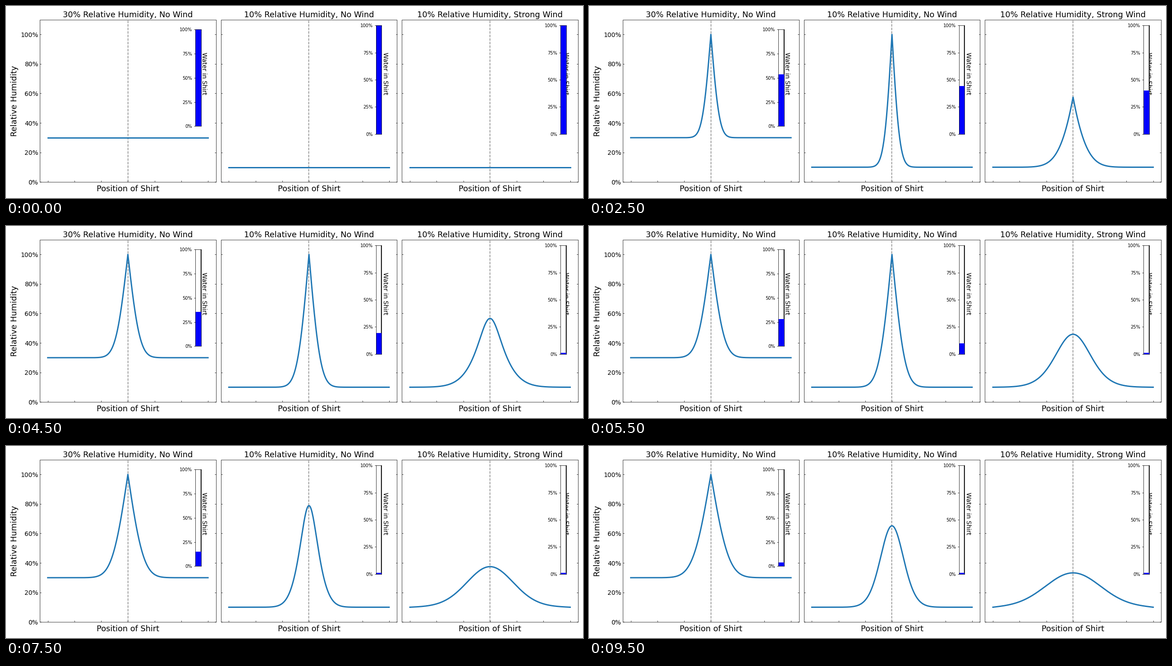
A matplotlib script for the animation above (10000 ms loop, 1280 px wide and 427 px high).

```python
import math
import numpy as np
import matplotlib.pyplot as plt
from matplotlib.animation import FuncAnimation
from matplotlib.patches import Rectangle

W, H = 1280, 427
# layout units: the figure is designed on an 18 x 6 inch sheet at 72 units per inch
SHEET_W, SHEET_H = 1296, 432
DPI = W / 18
FRAMES, INTERVAL = 20, 500

# Diffusion model: lengths in grid cells, time in seconds, humidity in percent
POINTS = 357
SUBSTEPS = 300
EVAPORATION = 867.0
FULL_SHIRT = 3620.0
AMBIENT = np.array([30.0, 10.0, 10.0])
DIFFUSIVITY = np.array([53.0, 53.0, 265.0])
MIN_FILL = 0.0125

TITLES = ("30% Relative Humidity, No Wind",
          "10% Relative Humidity, No Wind",
          "10% Relative Humidity, Strong Wind")
PANEL_LEFT, PANEL_TOP = 75.78, 30.8
PANEL_W, PANEL_H, PANEL_GAP = 395.94, 365.12, 10.8
# left, top, width, height of each water gauge
GAUGES = ((425.45, 52.9, 13.15, 217.5),
          (831.45, 43.8, 12.15, 244.3),
          (1245.45, 43.8, 13.15, 244.3))


def simulate():
    """Humidity profiles and water fractions at every frame."""
    dt = INTERVAL / 1000 / SUBSTEPS
    mid = POINTS // 2
    air = np.repeat(AMBIENT[:, None], POINTS, axis=1)
    water = np.full(3, FULL_SHIRT)
    rate = DIFFUSIVITY[:, None] * dt
    profiles, fills = [air.copy()], [water / FULL_SHIRT]
    for _ in range(FRAMES - 1):
        for _ in range(SUBSTEPS):
            air[:, 1:-1] += rate * (air[:, 2:] - 2 * air[:, 1:-1] + air[:, :-2])
            room = np.maximum(100 - air[:, mid], 0)
            vapour = np.minimum(np.minimum(EVAPORATION * dt, room), water)
            air[:, mid] += vapour
            water = water - vapour
        profiles.append(air.copy())
        fills.append(np.maximum(water / FULL_SHIRT, MIN_FILL))
    return profiles, fills


def add_axes(left, top, width, height):
    return fig.add_axes([left / SHEET_W, 1 - (top + height) / SHEET_H,
                         width / SHEET_W, height / SHEET_H])


def add_frame(left, top, width, height):
    """Thin outline whose edges sit on whole layout units."""
    x0, x1, y0, y1 = (math.floor(v + 0.5) + 0.5
                      for v in (left, left + width, top, top + height))
    fig.add_artist(Rectangle((x0 / SHEET_W, 1 - y1 / SHEET_H),
                             (x1 - x0) / SHEET_W, (y1 - y0) / SHEET_H,
                             fill=False, lw=0.8, snap=False,
                             transform=fig.transFigure))


def make_panel(index):
    left = PANEL_LEFT + index * (PANEL_W + PANEL_GAP)
    box = (left, PANEL_TOP, PANEL_W, PANEL_H)
    ax = add_axes(*box)
    ax.spines[:].set_visible(False)
    add_frame(*box)
    ax.set_xlim(-1.1, 1.1)
    ax.set_ylim(0, 110)
    ax.set_title(TITLES[index], fontsize=18)
    ax.set_xticks(np.linspace(-1, 1, 7), [""] * 7)
    levels = range(0, 101, 20)
    ax.set_yticks(levels, [f"{v}%" if index == 0 else "" for v in levels])
    ax.tick_params(direction="in", right=True, labelsize=14)
    if index == 0:
        ax.set_ylabel("Relative Humidity", fontsize=18)
    ax.text(0.5, -0.0585, "Position of Shirt", fontsize=18, ha="center",
            transform=ax.transAxes)
    ax.text(0.921, 0.667, "Water in Shirt", fontsize=14, rotation=270,
            rotation_mode="anchor", ha="center", va="baseline",
            transform=ax.transAxes)
    center = left + PANEL_W / 2
    ax.axvline((round(center) - center) * 2.2 / PANEL_W, color="gray", lw=1.5,
               ls="--", zorder=1, snap=False)
    line, = ax.plot(POSITION, np.full(POINTS, AMBIENT[index]), color="C0", lw=3)
    return line


def make_gauge(box):
    ax = add_axes(*box)
    ax.set_xlim(0, 1)
    ax.set_ylim(0, 1)
    ax.set_xticks([])
    levels = np.linspace(0, 1, 5)
    ax.set_yticks(levels, [f"{v:.0%}" for v in levels], fontsize=10)
    ax.axvline(1, color="black", lw=2.4, zorder=0.5)
    return ax.bar(0.5, 1, width=1, color="blue")[0]


plt.rcParams["font.family"] = "DejaVu Sans"
POSITION = np.linspace(-1, 1, POINTS)
# the small surplus keeps the pixel size from rounding down
fig = plt.figure(figsize=((W + 0.01) / DPI, (H + 0.01) / DPI), dpi=DPI, facecolor="white")
lines = [make_panel(i) for i in range(3)]
bars = [make_gauge(box) for box in GAUGES]
profiles, fills = simulate()


def update(frame):
    for line, bar, profile, fill in zip(lines, bars, profiles[frame], fills[frame]):
        line.set_ydata(profile)
        bar.set_height(fill)
    return lines + bars


anim = FuncAnimation(fig, update, frames=FRAMES, interval=INTERVAL, repeat=True,
                     repeat_delay=0, blit=False)
plt.show()
```
